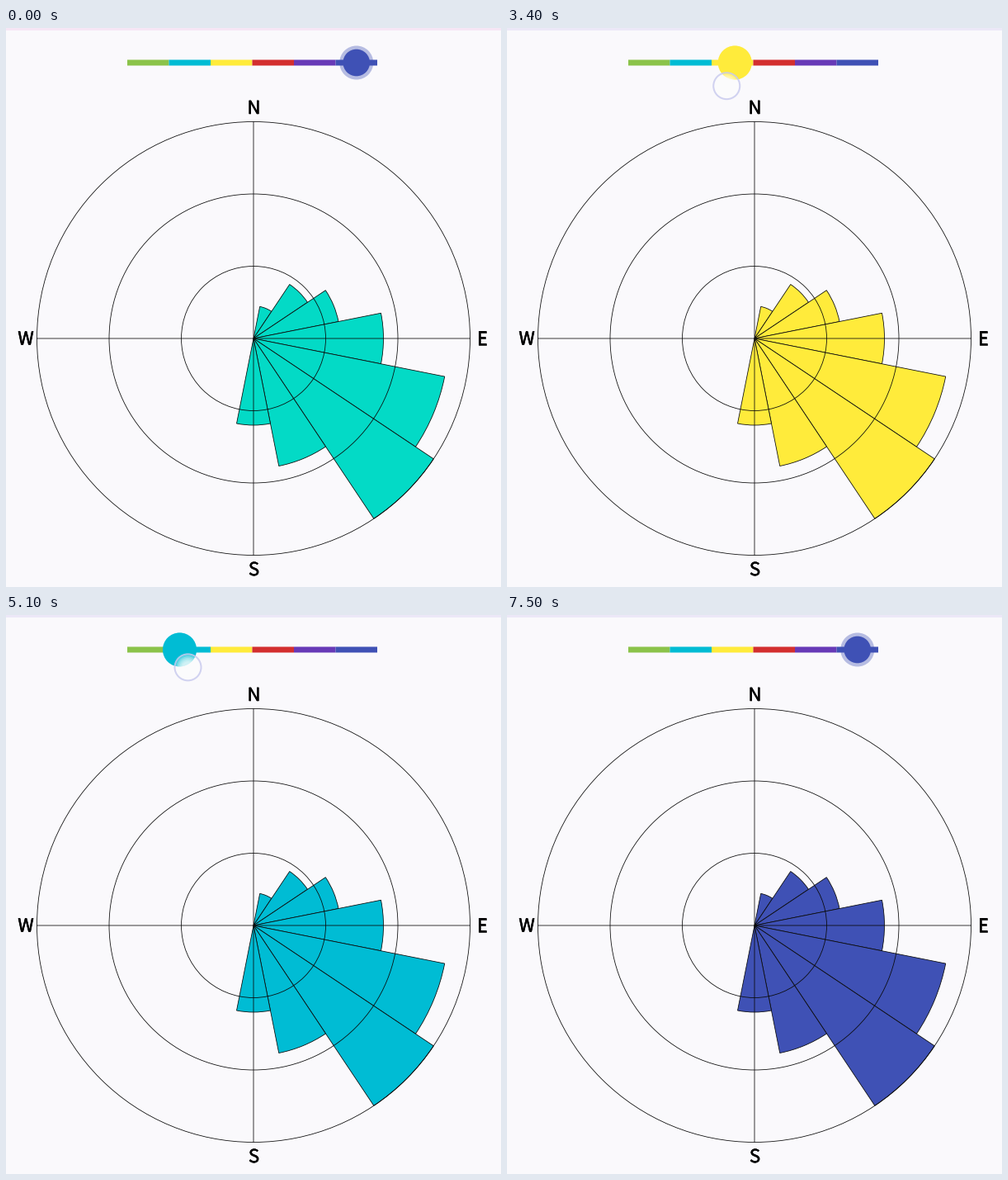
Write a matplotlib script that moves like this. It is 600 px wide and 677 px high and loops after 8000 ms.

```python
import numpy as np
import matplotlib.pyplot as plt
import matplotlib.patheffects as pe
from matplotlib.animation import FuncAnimation
from matplotlib.patches import Circle, Rectangle, Wedge

W, H, DPI = 600, 677, 100
FRAMES, STEP = 80, 100
PX = 72 / DPI

BG, INK, TEAL = "#faf9fc", "#0a0a0a", "#03dac6"
SEGMENTS = ["#8bc34a", "#00bcd4", "#ffeb3b", "#d32f2f", "#673ab7", "#3f51b5"]
LEFT, RIGHT, TRACK_Y = 147, 450, 42
SEG_W = (RIGHT - LEFT) / len(SEGMENTS)
REST = RIGHT - SEG_W / 2  # the thumb settles mid-segment
SLACK = 10                # the thumb trails the finger by this much

CX, CY, R = 300, 376, 262.5
ROSE = [0.15, 0.3, 0.4, 0.6, 0.9, 1.0, 0.6, 0.4]  # NNE clockwise to S

PRESS, RELEASE = 1.8, 7.1
FINGER = [(1.9, 428.5), (4.53, 144), (5.1, 220.5), (6.2, 307), (RELEASE, 488)]


def ramp(t, start, end):
    return np.clip((t - start) / (end - start), 0, 1)


def finger_x(t):
    return np.interp(t, *zip(*FINGER))


def finger_y(t):
    return 41 + 30 * np.sin(np.pi * ramp(t, PRESS, 6.8) ** 0.75)


def thumb_x(t):
    if t < PRESS:
        return REST
    heading = np.sign(finger_x(t + 0.05) - finger_x(t - 0.05))
    x = np.clip(finger_x(t) - SLACK * heading, LEFT, RIGHT)
    return REST + (x - REST) * (1 - ramp(t, RELEASE, 7.5)) ** 2


def segment_color(x):
    return SEGMENTS[min(int((x - LEFT) / SEG_W), len(SEGMENTS) - 1)]


fig = plt.figure(figsize=(W / DPI, H / DPI), dpi=DPI, facecolor=BG)
ax = fig.add_axes([0, 0, 1, 1])
ax.set(xlim=(0, W), ylim=(H, 0))
ax.axis("off")


def add(patch, z):
    patch.set(zorder=z, snap=False)
    return ax.add_patch(patch)


strip = add(Rectangle((0, 0), W, 3, lw=0), 1)
for i, color in enumerate(SEGMENTS):
    add(Rectangle((LEFT + i * SEG_W, TRACK_Y - 3.5), SEG_W, 7,
                  fc=color, lw=0), 1)

# Wind rose; the y axis points down, so angles run clockwise from east
edge = dict(ec=INK, lw=0.8 * PX)
petals = []
for k, share in enumerate(ROSE, start=1):
    mid = 22.5 * k - 90
    petals.append(add(Wedge((CX, CY), share * R, mid - 11.25, mid + 11.25,
                            **edge), 2))
for ring in (1, 2, 3):
    add(Circle((CX, CY), R * ring / 3, fill=False, **edge), 3)
for dx, dy in [(R, 0), (0, R)]:
    ax.plot([CX - dx, CX + dx], [CY - dy, CY + dy], color=INK, lw=0.8 * PX,
            snap=False, zorder=3)

bold = [pe.withStroke(linewidth=0.6 * PX, foreground="black")]
for name, dx, dy in [("N", 0, -1), ("E", 1, 0), ("S", 0, 1), ("W", -1, 0)]:
    ax.text(CX + 0.5 + 276.5 * dx, CY + 7.5 + 279.5 * dy, name, ha="center",
            va="baseline", family="Noto Sans CJK JP", size=22 * PX,
            color="black", zorder=4, path_effects=bold)

# Thumb and touch spot, the spot denser toward its middle
halo = add(Circle((0, 0), 20.5, lw=0, alpha=0.36), 5)
core = add(Circle((0, 0), 16.3, lw=0), 6)
spot = [add(Circle((0, 0), r, fc="white", lw=0), 7)
        for r in np.linspace(16, 7, 7)]
rim = add(Circle((0, 0), 16, fill=False, ec="#c9cbee", lw=2 * PX), 8)


def draw(i):
    t = i * STEP / 1000
    x = thumb_x(t)
    color = segment_color(x)

    strip.set_facecolor("#f6e6f5" if t < 0.4 else "#ece8f7")
    for petal in petals:
        petal.set_facecolor(color if t > PRESS else TEAL)

    for disc in (halo, core):
        disc.center = x, TRACK_Y
        disc.set_facecolor(color)
    pressed = ramp(t, PRESS, PRESS + 0.2) - ramp(t, RELEASE, 7.5)
    core.set_radius(16.3 + 4.2 * pressed)

    shown = (t >= PRESS) * (1 - ramp(t, RELEASE, 7.3))
    for disc in (*spot, rim):
        disc.center = finger_x(t), finger_y(t)
        disc.set_alpha(0.22 * shown)
    rim.set_alpha(0.85 * shown)
    return [strip, *petals, halo, core, *spot, rim]


anim = FuncAnimation(fig, draw, frames=FRAMES, interval=STEP,
                     init_func=lambda: draw(0), repeat=True, repeat_delay=0)
plt.show()
```
